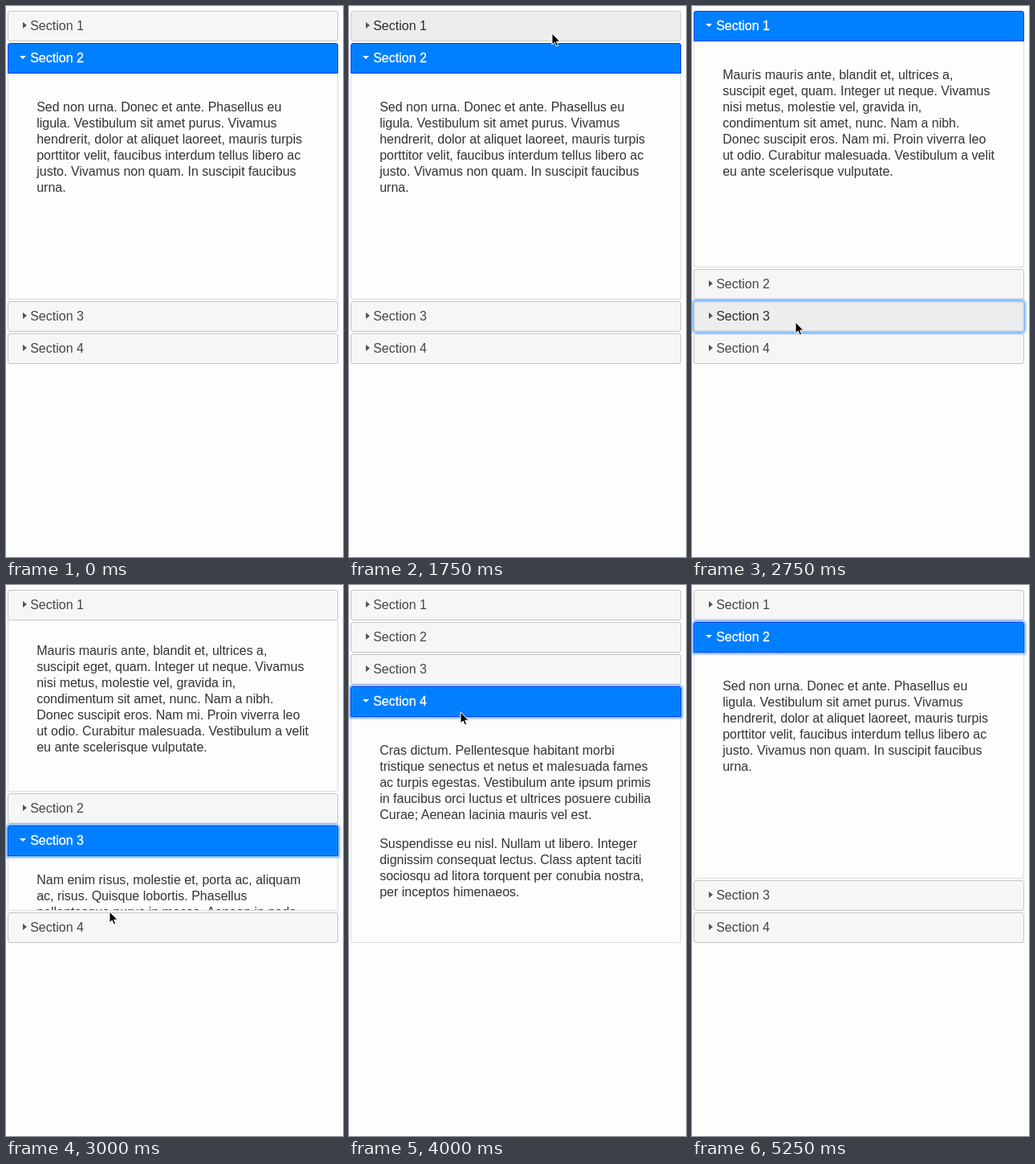
Write an HTML page that moves like this. It is 420 px wide and 685 px high and loops after 6.5 s.

```html
<!DOCTYPE html>
<html lang="en">
<head>
<meta charset="utf-8">
<title>Accordion</title>
<style>
  html, body { margin: 0; width: 100%; height: 100%; overflow: hidden; background: #fdfdfd; }
  body { position: relative; font: 16px/20px Arial, "Liberation Sans", sans-serif; color: #333; }
  .header, .panel { position: absolute; left: 2px; width: 412px; box-sizing: border-box; }
  .header {
    height: 38px; padding: 8px 0 0 27.2px;
    border: 1px solid #c5c5c5; border-radius: 3px;
    background: #f6f6f6; color: #454545;
  }
  .header::before {
    content: ""; position: absolute; left: 18px; top: 13px; width: 5px; height: 8px;
    background: #555; clip-path: polygon(0 0, 100% 50%, 0 100%);
  }
  .header.hover { background: #ededed; border-color: #ccc; color: #2b2b2b; }
  .header.active {
    background: #007fff; border-color: #003eff; color: #fff;
    border-radius: 3px 3px 0 0; -webkit-text-stroke: .3px #fff;
  }
  .header.active::before {
    left: 14px; top: 15px; width: 8px; height: 4px;
    background: #fff; clip-path: polygon(0 0, 100% 0, 50% 100%);
  }
  .header.focus {
    z-index: 1;
    box-shadow: 0 0 3px 2px #6eb1f8, inset 0 0 2px rgba(110, 177, 248, .7);
  }
  .panel {
    padding: 0 35.2px; overflow: hidden; white-space: nowrap;
    border: 1px solid #ddd; border-top: 0; border-radius: 0 0 3px 3px;
  }
  p, ul { margin: 16px 0; }
  ul { padding-left: 40px; }
  #cursor { position: absolute; left: 0; top: 0; z-index: 2; overflow: visible; }
</style>
</head>
<body>
<div class="header">Section 1</div>
<div class="panel">
  <p>Mauris mauris ante, blandit et, ultrices a,<br>suscipit eget, quam. Integer ut neque. Vivamus<br>nisi metus, molestie vel, gravida in,<br>condimentum sit amet, nunc. Nam a nibh.<br>Donec suscipit eros. Nam mi. Proin viverra leo<br>ut odio. Curabitur malesuada. Vestibulum a velit<br>eu ante scelerisque vulputate.</p>
</div>
<div class="header">Section 2</div>
<div class="panel">
  <p>Sed non urna. Donec et ante. Phasellus eu<br>ligula. Vestibulum sit amet purus. Vivamus<br>hendrerit, dolor at aliquet laoreet, mauris turpis<br>porttitor velit, faucibus interdum tellus libero ac<br>justo. Vivamus non quam. In suscipit faucibus<br>urna.</p>
</div>
<div class="header">Section 3</div>
<div class="panel">
  <p>Nam enim risus, molestie et, porta ac, aliquam<br>ac, risus. Quisque lobortis. Phasellus<br>pellentesque purus in massa. Aenean in pede.<br>Phasellus ac libero ac tellus pellentesque<br>semper. Sed ac felis. Sed commodo, magna<br>quis lacinia ornare, quam ante aliquam nisi, eu<br>iaculis leo purus venenatis dui.</p>
  <ul><li>List item one</li><li>List item two</li><li>List item three</li></ul>
</div>
<div class="header">Section 4</div>
<div class="panel">
  <p>Cras dictum. Pellentesque habitant morbi<br>tristique senectus et netus et malesuada fames<br>ac turpis egestas. Vestibulum ante ipsum primis<br>in faucibus orci luctus et ultrices posuere cubilia<br>Curae; Aenean lacinia mauris vel est.</p>
  <p>Suspendisse eu nisl. Nullam ut libero. Integer<br>dignissim consequat lectus. Class aptent taciti<br>sociosqu ad litora torquent per conubia nostra,<br>per inceptos himenaeos.</p>
</div>
<svg id="cursor" width="12" height="18">
  <path d="M1 1V15L4.2 12L6.4 17L8.7 16L6.6 11.2H11Z" fill="#000" stroke="#fff" stroke-linejoin="round"/>
</svg>
<script>
const LOOP = 6500, TICK = 250, SLIDE = 400, FULL = 281;
const headers = [...document.querySelectorAll('.header')];
const panels = [...document.querySelectorAll('.panel')];
const cursor = document.getElementById('cursor');

// Each cue keeps the earlier values it does not set; sections count from 1.
const cues = [
  { at: 0, open: 2, from: 0, clicked: -SLIDE, focus: 0, hover: 0, mouse: null },
  { at: 750, mouse: [238, 116] },
  { at: 1000, mouse: [228, 115] },
  { at: 1250, mouse: [257, 17] },
  { at: 1750, mouse: [252, 33], hover: 1 },
  { at: 2000, mouse: [251, 31], open: 1, from: 2, clicked: 1936, focus: 1 },
  { at: 2250, mouse: [219, 127], hover: 0 },
  { at: 2500, mouse: [130, 409] },
  { at: 2750, mouse: [128, 392], hover: 3, focus: 3 },
  { at: 3000, mouse: [128, 405], hover: 0, open: 3, from: 1, clicked: 2869 },
  { at: 3250, mouse: [131, 429], hover: 4 },
  { at: 3500, mouse: [132, 435], focus: 4 },
  { at: 3750, mouse: [134, 425], open: 4, from: 3, clicked: 3570 },
  { at: 4000, mouse: [138, 157], hover: 0 },
  { at: 4250, mouse: [142, 117], hover: 3 },
  { at: 4500, mouse: [148, 66], hover: 2 },
  { at: 4750, mouse: [148, 65], open: 2, from: 4, clicked: 4657, focus: 2 },
  { at: 5000, mouse: null, hover: 0 }
];

const swing = t => 0.5 - Math.cos(Math.PI * Math.min(1, t)) / 2;

function render(time) {
  const s = Object.assign({}, ...cues.filter(cue => cue.at <= time));
  const grown = Math.round(FULL * swing((time - s.clicked) / SLIDE));
  let y = 6;
  headers.forEach((header, i) => {
    const n = i + 1, panel = panels[i];
    const height = n === s.open ? grown : n === s.from ? FULL - grown : 0;
    header.style.top = y + 'px';
    header.classList.toggle('active', n === s.open);
    header.classList.toggle('hover', n === s.hover);
    header.classList.toggle('focus', n === s.focus);
    panel.style.display = height ? 'block' : 'none';
    panel.style.top = y + 38 + 'px';
    panel.style.height = height + 'px';
    panel.style.paddingTop = 16 * height / FULL + 'px';
    y += 40 + height;
  });
  cursor.style.display = s.mouse ? 'block' : 'none';
  if (s.mouse) cursor.style.transform = `translate(${s.mouse[0]}px, ${s.mouse[1]}px)`;
}

const start = performance.now();
let shown = -1;
function frame() {
  const time = Math.floor((performance.now() - start) % LOOP / TICK) * TICK;
  if (time !== shown) render(shown = time);
  requestAnimationFrame(frame);
}
frame();
</script>
</body>
</html>
```
